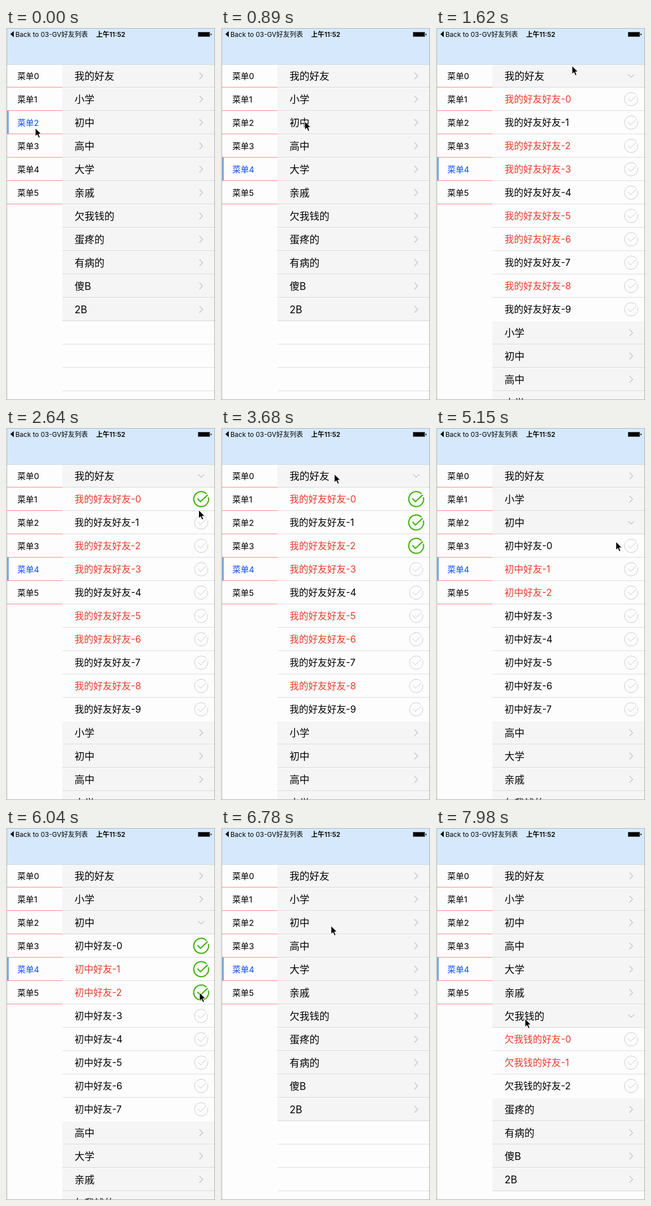
Recreate the animation shown at these times as an HTML page. Size 378 by 669 pixels, loop 8 s.

```html
<!DOCTYPE html>
<html lang="zh-CN">
<head>
<meta charset="utf-8">
<style>
  html, body { margin: 0; width: 100%; height: 100%; overflow: hidden; background: #fdfdfd; }
  svg { display: block; width: 100vw; height: 100vh; font-family: Inter, "Noto Sans CJK SC", "Noto Sans CJK", sans-serif; }
</style>
</head>
<body>
<svg id="stage" viewBox="0 0 378 669"></svg>
<script>
const LOOP = 8000, TICK = 147.4;   // the screen refreshes once per tick
const WIDTH = 378, HEIGHT = 669, TOP = 65, ROW = 42, LIST_X = 102, CHECK_X = 338;

const groups = ['我的好友', '小学', '初中', '高中', '大学', '亲戚', '欠我钱的', '蛋疼的', '有病的', '傻B', '2B'];
const friends = {
  '我的好友': { count: 10, red: '023568' },
  '初中': { count: 8, red: '12' },
  '欠我钱的': { count: 3, red: '01' }
};

const tap = (at, x, y) => ({ at, x, y });
// Three taps down the check marks, starting in the given row
const tapChecks = (at, pause, row) =>
  [0, 1, 2].map(i => tap(at + i * pause, 348 + i, TOP + (row + i) * ROW + 19 + i));
const taps = [
  tap(0, 53, 180), tap(4, 57, 268), tap(10, 246, 68), ...tapChecks(17, 2, 1),
  tap(27, 205, 83), tap(32, 203, 175), ...tapChecks(36, 2.5, 3),
  tap(46, 199, 176), tap(53, 161, 343)
];

// Replays every tap so far; the column tapped decides what happens.
function stateAt(tick) {
  const state = { selected: 2, open: -1, checked: new Set() };
  for (const { at, x, y } of taps) {
    if (at > tick) break;
    const row = Math.floor((y - TOP) / ROW);
    if (x < LIST_X) state.selected = row;
    else if (x > CHECK_X) state.checked.add(groups[state.open] + (row - state.open - 1));
    else state.open = row === state.open ? -1 : row;
  }
  return state;
}

// The pointer travels for up to four ticks, then may rest briefly before tapping.
function pointerAt(tick) {
  const next = taps.findIndex(t => t.at > tick);
  if (next < 0) return taps[taps.length - 1];
  const from = taps[next - 1], to = taps[next], gap = to.at - from.at;
  const rest = Math.min(2, Math.max(0, gap - 4)), travel = Math.min(4, gap);
  const k = Math.min(1, Math.max(0, (tick - (to.at - rest - travel)) / travel));
  const eased = k * k * (3 - 2 * k);
  return { x: from.x + (to.x - from.x) * eased, y: from.y + (to.y - from.y) * eased };
}

const rect = (x, y, w, h, fill) => `<rect x="${x}" y="${y}" width="${w}" height="${h}" fill="${fill}"/>`;
const text = (x, y, size, label, fill = '#000', weight = 400) =>
  `<text x="${x}" y="${y}" font-size="${size}" fill="${fill}" font-weight="${weight}">${label}</text>`;
const line = (d, color, width) => `<path d="${d}" fill="none" stroke="${color}" stroke-width="${width}"/>`;
const separator = (y, color) => rect(LIST_X, y + ROW - 1, 275, 1, color);

function chevron(y, open) {
  return line(open ? `M347.5 ${y - 2.5}l5.5 5 5.5-5` : `M350 ${y - 6}l5.5 6-5.5 6`, '#c7c7cc', 1.5);
}

function checkMark(y, on) {
  const ring = 'M11.6-3.1A12 12 0 1 1 8.5-8.5', tick = 'M-6-1L-1.2 4 10.5-7';
  return `<g transform="translate(353 ${y}) scale(${on ? 1.12 : 1})">` +
    line(ring + tick, on ? '#43b310' : '#c9c9c9', on ? 2 : 1) + '</g>';
}

function statusBar() {
  return rect(0, 0, WIDTH, TOP, '#d6e9fc') + rect(0, TOP, WIDTH, 1, '#cbd5de') +
    '<path d="M8 11l6-5.5v11z"/>' +
    text(17, 15.5, 12, 'Back to 03-GV好友列表') +
    text(163, 15.5, 12, '上午11:52', '#000', 600) +
    rect(347, 7, 22, 9, '#59626a') + rect(348, 8, 20, 7, '#000') + rect(370, 10, 1.5, 3, '#000');
}

function menu(selected) {
  let out = '';
  for (let i = 0; i < 6; i++) {
    const y = TOP + i * ROW, active = i === selected;
    if (active) out += rect(2, y, 3, ROW - 1, '#76a9de');
    out += text(20.5, y + 26.5, 15, '菜单' + i, active ? '#0b4ff0' : '#000') +
      rect(2, y + ROW - 1, 100, 1, '#f28b88');
  }
  return out;
}

function list({ open, checked }) {
  let out = '', y = TOP;
  groups.forEach((name, g) => {
    out += rect(LIST_X, y + 1, 275, ROW - 1, '#f5f5f5') + separator(y, '#d5d5d5') +
      text(124, y + 27.7, 18, name) + chevron(y + 21, g === open);
    y += ROW;
    if (g !== open) return;
    const { count, red } = friends[name];
    for (let i = 0; i < count; i++, y += ROW) {
      out += text(124, y + 27.2, 17, `${name}好友-${i}`, red.includes(i) ? '#e83c2e' : '#000') +
        checkMark(y + 21, checked.has(name + i));
      if (i < count - 1) out += separator(y, '#dcdcdc');
    }
  });
  for (; y < HEIGHT; y += ROW) out += separator(y, '#dedede');
  return out;
}

function pointer({ x, y }) {
  return `<path transform="translate(${x} ${y})" d="M0 0V15L3.5 11.8 6 17.5 8.6 16.4 6.2 10.8H11Z" stroke="#fff"/>`;
}

const border = rect(0, 0, WIDTH, 1, '#a9b4bd') + rect(0, 0, 1, HEIGHT, '#f0f0f0') + rect(1, 0, 1, HEIGHT, '#b0b0b0') +
  rect(WIDTH - 1, 0, 1, HEIGHT, '#a8a8a8') + rect(0, HEIGHT - 1, WIDTH, 1, '#b0b0b0');

const stage = document.getElementById('stage');
let shown = -1;

function draw() {
  const tick = Math.floor((performance.now() % LOOP + 20) / TICK);
  if (tick !== shown) {
    shown = tick;
    const state = stateAt(tick);
    stage.innerHTML = rect(0, 0, WIDTH, HEIGHT, '#fdfdfd') + list(state) + menu(state.selected) +
      statusBar() + border + pointer(pointerAt(tick));
  }
  requestAnimationFrame(draw);
}
draw();
</script>
</body>
</html>
```
